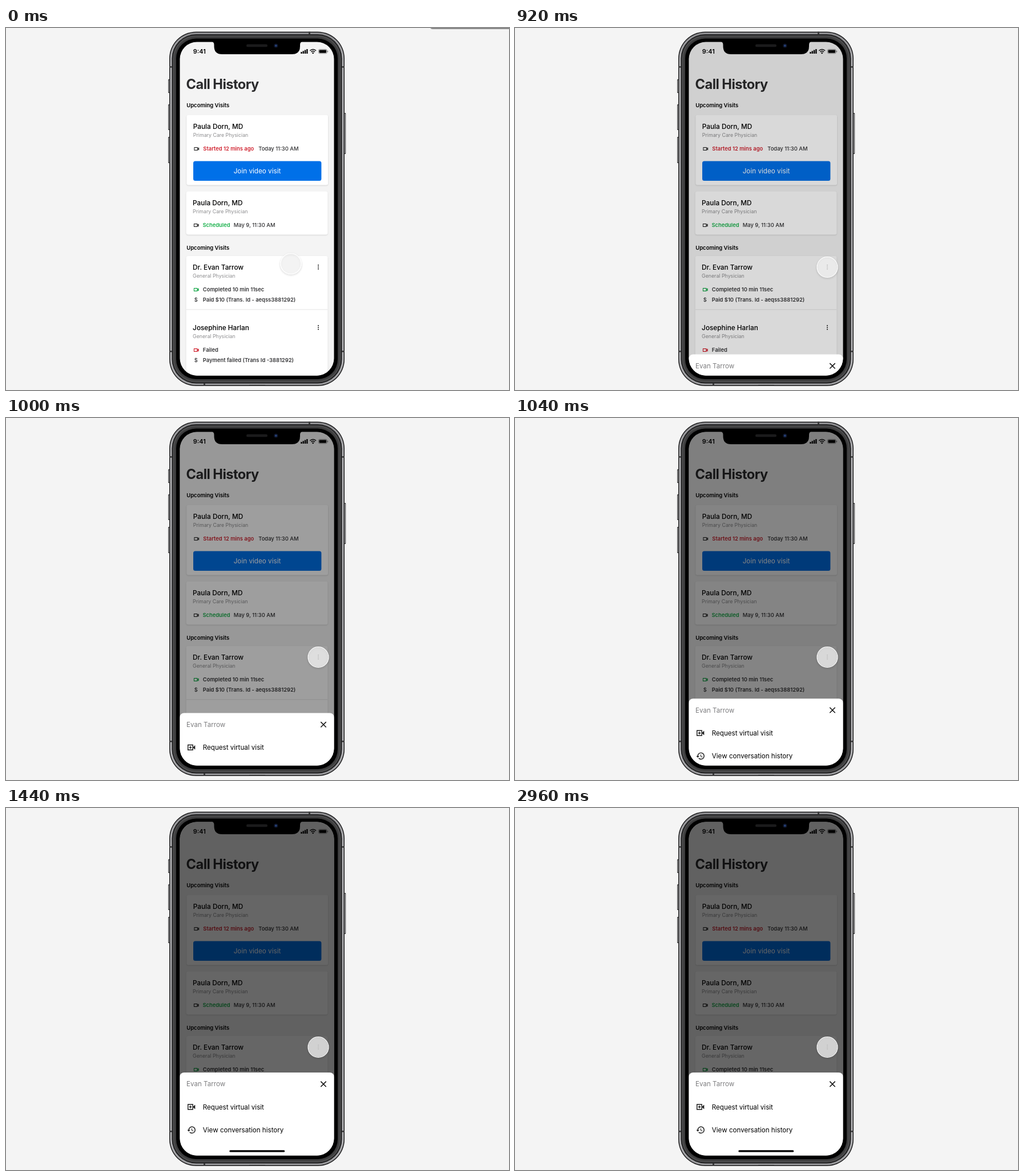
An HTML page that plays this animation: 881x635 px, repeating every 3.08 s.

```html
<!DOCTYPE html>
<html lang="en">
<head>
<meta charset="utf-8">
<title>Call History</title>
<style>
  html, body { margin: 0; width: 100%; height: 100%; overflow: hidden; background: #f4f4f4; }
  svg { display: block; width: 881px; height: 635px; }
  text { font-family: Inter, "Open Sans", sans-serif; font-optical-sizing: none; fill: #000; }
  .title { font-size: 23.7px; font-weight: 700; letter-spacing: -.6px; fill: #2b2b2d; }
  .clock { font-size: 10.9px; font-weight: 600; }
  .section { font-size: 9.5px; font-weight: 600; }
  .name { font-size: 11.8px; font-weight: 500; }
  .role { font-size: 8.8px; fill: #8d8d8f; }
  .info { font-size: 9.4px; font-weight: 500; fill: #2f2f31; }
  .status { font-size: 9.4px; font-weight: 600; fill: #353537; }
  .button { font-size: 11.7px; fill: #fff; text-anchor: middle; }
  .item { font-size: 11.6px; }
  .line { fill: none; stroke-linejoin: round; }
</style>
</head>
<body>
<svg viewBox="0 0 881 635">
  <defs>
    <clipPath id="screen"><rect x="304.5" y="24.5" width="270" height="585" rx="30"/></clipPath>
    <filter id="cardShadow" x="-10%" y="-10%" width="120%" height="125%">
      <feDropShadow dx="0" dy="1" stdDeviation="1.1" flood-opacity=".17"/>
    </filter>
    <filter id="touchShadow" x="-50%" y="-50%" width="200%" height="200%">
      <feDropShadow dx="0" dy="1.5" stdDeviation="1.6" flood-opacity=".28"/>
    </filter>
    <linearGradient id="steel" x2="0" y2="1">
      <stop offset="0" stop-color="#8e8e91"/><stop offset=".1" stop-color="#b8b8bb"/>
      <stop offset=".5" stop-color="#a6a6a9"/><stop offset=".92" stop-color="#b8b8bb"/>
      <stop offset="1" stop-color="#9a9a9d"/>
    </linearGradient>
    <path id="video" class="line" d="M.6 .6h5.6v4.8H.6zM6.2 2.7 8.4 1.2v3.6L6.2 3.3" stroke-width="1.1"/>
    <g id="dots" fill="#222"><circle cy="-3.3" r="1.05"/><circle r="1.05"/><circle cy="3.3" r="1.05"/></g>
  </defs>

  <rect width="881" height="635" fill="#f4f4f4"/>
  <path id="corner" d="M742 -3H884V2H747Q743 2 742 -3Z" fill="#8b8b8b"/>

  <g id="body"></g>

  <g clip-path="url(#screen)">
    <rect x="304" y="24" width="271" height="586" fill="#f4f4f4"/>
    <g id="page"></g>
    <rect id="shade" x="304" y="24" width="271" height="586" opacity="0"/>
    <g id="touch">
      <circle r="17.9" fill="none" stroke="#fff" stroke-width="1.3" filter="url(#touchShadow)"/>
      <circle r="17.3" fill="#f0f0f0" fill-opacity=".78"/>
    </g>
    <g id="sheet">
      <rect x="304" width="271" height="160" rx="8" fill="#fff"/>
      <g id="menu"></g>
      <path d="M551.3 15.6 560.7 25M560.7 15.6 551.3 25" stroke="#111" stroke-width="1.5"/>
      <g fill="none" stroke="#1b1b1b" stroke-width="1.4">
        <path d="M318.7 56h8.5v8.8h-8.5zM320.6 60.4h4.8M323 58v4.8"/>
        <path d="M327.6 60.4 331 57v6.8z" fill="#1b1b1b" stroke-width=".6"/>
      </g>
      <path transform="translate(316.7 92.5) scale(.69)" fill="#1b1b1b"
        d="M13 3a9 9 0 0 0-9 9H1l3.89 3.89.07.14L9 12H6a7 7 0 1 1 2.06 4.94l-1.42 1.42A9 9 0 1 0 13 3zm-1 5v5l4.28 2.54.72-1.21-3.5-2.08V8z"/>
      <rect x="391.3" y="136.2" width="97" height="3.4" rx="1.7"/>
    </g>
  </g>

  <path d="M359 23.5Q364.5 24 364.5 29.5V32Q364.5 46 378.5 46H501Q515 46 515 32V29.5Q515 24 520.5 23.5Z"/>
  <rect x="421" y="28.6" width="37" height="4.6" rx="2.3" fill="#1b1b1c"/>
  <circle cx="472.8" cy="31" r="3.6" fill="#10182c"/>
  <circle cx="472.8" cy="31" r="1.8" fill="#27457f"/>
</svg>

<script>
const LOOP = 3080, STEP = 40;
const $ = id => document.getElementById(id);
const put = (id, ...parts) => { $(id).innerHTML += parts.join(""); };

const text = (kind, x, y, words, fill) =>
  `<text class="${kind}" x="${x}" y="${y}"${fill ? ` style="fill:${fill}"` : ""}>${words}</text>`;
const rect = (x, y, w, h, r, fill, more = "") =>
  `<rect x="${x}" y="${y}" width="${w}" height="${h}" rx="${r}" fill="${fill}" ${more}/>`;
const card = (x, y, w, h) => rect(x, y, w, h, 3, "#fff", 'filter="url(#cardShadow)"');
const video = (x, y, color) => `<use href="#video" x="${x}" y="${y}" stroke="${color}"/>`;
const person = (x, y, name, role) => text("name", x, y, name) + text("role", x, y + 14.1, role);

// A rounded layer of the phone body, inset from its outer edge
const layer = (inset, fill) =>
  rect(286 + inset, 6.5 + inset, 307 - 2 * inset, 621.5 - 2 * inset, 47 - inset, fill);
const sideButton = (x, y, h) =>
  rect(x, y, 3.6, h, 1, "#333") + rect(x + .8, y + 1.2, 2, h - 2.4, .6, "#a0a0a3");

put("body",
  sideButton(284, 90, 24), sideButton(284, 134, 45), sideButton(284, 191, 46),
  sideButton(591.6, 149, 72),
  layer(0, "#1c1c1d"), layer(1.5, "url(#steel)"), layer(4.5, "#1a1a1b"),
  layer(6.2, "#4a4a4b"), layer(9, "#3c3c3d"), layer(12, "#000"),
  [67, 566].map(y => rect(286, y, 5, 2.6, 0, "#3a3a3b") + rect(588, y, 5, 2.6, 0, "#3a3a3b")).join(""),
  rect(530, 6.5, 3, 5, 0, "#3a3a3b"), rect(346, 623, 3, 5, 0, "#3a3a3b"),
  rect(426, 626, 28, 1.6, .8, "#3a3a3b"));

const bars = [0, 1, 2, 3].map(i => rect(516.3 + i * 3.3, 42 - i * 1.7, 2.3, 3 + i * 1.7, .5, "#000"));

put("page",
  text("clock", 327.8, 44.8, "9:41"), ...bars,
  `<path class="line" stroke="#000" stroke-width="1.5" d="M532.3 39.8Q537.7 35.2 543.1 39.8M534.3 42Q537.7 39 541.1 42"/>`,
  `<path d="M535.8 43.4Q537.7 41.9 539.6 43.4L537.7 45.4Z"/>`,
  rect(547.4, 37.4, 14.8, 7.4, 2, "none", 'stroke="#777" stroke-width=".7"'),
  rect(548.5, 38.5, 12.6, 5.2, 1.1, "#000"), rect(562.9, 39.8, 1.1, 2.6, .5, "#777"),

  text("title", 315.6, 106.6, "Call History"),
  text("section", 316.2, 139.3, "Upcoming Visits"),

  card(316.5, 152.8, 247.5, 122.5),
  person(327.8, 176.6, "Paula Dorn, MD", "Primary Care Physician"),
  video(329.3, 209, "#333"),
  text("status", 345.3, 215.4, "Started 12 mins ago", "#d0222f"),
  text("info", 442.3, 215.4, "Today 11:30 AM"),
  rect(328, 233.6, 224.4, 34.4, 3.5, "#0070e8"),
  text("button", 440, 255.2, "Join video visit"),

  card(315.8, 286.8, 247.5, 75.4),
  person(327.1, 310.6, "Paula Dorn, MD", "Primary Care Physician"),
  video(328.8, 343, "#333"),
  text("status", 344.4, 349.3, "Scheduled", "#17b04a"),
  text("info", 398.7, 349.3, "May 9, 11:30 AM"),

  text("section", 316.2, 389.3, "Upcoming Visits"),
  card(315.8, 400, 247.5, 230),
  person(327.1, 423.6, "Dr. Evan Tarrow", "General Physician"),
  `<use href="#dots" x="547" y="419.3"/>`,
  video(328.8, 456, "#17a84a"),
  text("status", 344.8, 462.4, "Completed 10 min 11sec"),
  text("info", 329.8, 480, "$"),
  text("status", 344.8, 479.8, "Paid $10 (Trans. Id - aeqss3881292)"),
  rect(315.8, 493.4, 247.5, 1, 0, "#e4e4e4"),
  person(327.1, 529.6, "Josephine Harlan", "General Physician"),
  `<use href="#dots" x="547" y="525.3"/>`,
  video(328.8, 562, "#d0222f"),
  text("status", 344.8, 568.4, "Failed"),
  text("info", 329.8, 586, "$"),
  text("status", 344.8, 585.7, "Payment failed (Trans Id -3881292)"));

put("menu",
  text("item", 316, 24.4, "Evan Tarrow", "#7d7d7f"),
  text("item", 344.8, 64.7, "Request virtual visit"),
  text("item", 344.8, 105.2, "View conversation history"));

const ease = (t, start, length) => {
  const p = Math.min(1, Math.max(0, (t - start) / length));
  return (1 - Math.cos(Math.PI * p)) / 2;
};

function draw(now) {
  const t = Math.floor((now % LOOP) / STEP) * STEP;
  const move = ease(t, 0, 600);
  const open = ease(t, 813, 320);
  $("touch").setAttribute("transform", `translate(${499 + 48 * move} ${413.5 + 6 * move ** 4})`);
  $("sheet").setAttribute("transform", `translate(0 ${609 - 145 * open})`);
  $("shade").setAttribute("opacity", .6 * open);
  $("corner").setAttribute("visibility", t < 600 ? "visible" : "hidden");
}

let start;
function tick(now) {
  start ??= now;
  draw(now - start);
  requestAnimationFrame(tick);
}
draw(0);
requestAnimationFrame(tick);
</script>
</body>
</html>
```
